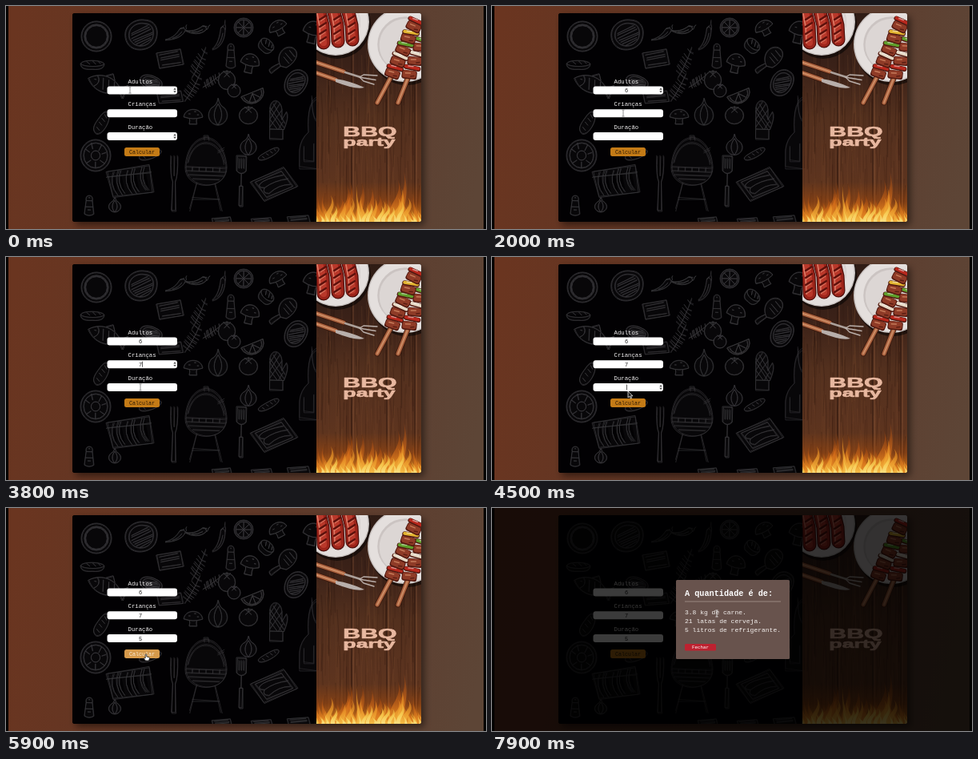
These frames come from a looping animation (600x279 px, 8 s). An HTML page with a canvas:

```html
<!DOCTYPE html>
<html lang="pt">
<head>
<meta charset="utf-8">
<title>Calculadora de churrasco</title>
<style>
html, body { margin: 0; width: 100%; height: 100%; overflow: hidden; background: #000; }
canvas { display: block; width: 600px; height: 279px; }
</style>
</head>
<body>
<canvas id="stage" width="600" height="279"></canvas>
<script>
const W = 600, H = 279, LOOP = 8000;
const MONO = '"Liberation Mono", monospace';
const view = document.getElementById('stage').getContext('2d');
const clamp = v => Math.min(1, Math.max(0, v));

let seed = 11;
function rand(a = 0, b = 1) {
  seed = (seed * 16807) % 2147483647;
  return a + (b - a) * seed / 2147483647;
}

function box(g, x, y, w, h, r, color) {
  g.fillStyle = color;
  g.beginPath();
  g.roundRect(x, y, w, h, r);
  g.fill();
}

function line(g, pts, color, width) {
  g.strokeStyle = color;
  g.lineWidth = width;
  g.beginPath();
  pts.forEach(([x, y]) => g.lineTo(x, y));
  g.stroke();
}

function disc(g, x, y, r, color) {
  g.fillStyle = color;
  g.beginPath();
  g.arc(x, y, r, 0, 7);
  g.fill();
}

function text(g, str, x, y, size, color, align = 'left', weight = '') {
  g.font = `${weight} ${size}px ${MONO}`;
  g.textAlign = align;
  g.fillStyle = color;
  g.fillText(str, x, y);
}

function blend(g, x0, y0, x1, y1, ...colors) {
  const grad = g.createLinearGradient(x0, y0, x1, y1);
  colors.forEach((c, i) => grad.addColorStop(i / (colors.length - 1), c));
  return grad;
}

// Chalk shapes, each in a box from -10 to 10.
const circle = r => `M${r} 0A${r} ${r} 0 1 1 ${-r} 0A${r} ${r} 0 1 1 ${r} 0`;
const shapes = {
  ring: circle(10) + circle(8) + circle(7.3),
  donut: circle(10) + circle(8) + circle(3) + 'M-7-4l3 2M-3-8l1 4M4-7l-2 4M7-2l-3 1M6 5l-3-2M0 8v-4M-6 5l3-2',
  citrus: circle(10) + circle(8.4) + 'M-8 0H8M0-8V8M-6-6L6 6M6-6L-6 6',
  half: 'M-10-3A10 10 0 0 0 10-3ZM-8-2A8 8 0 0 0 8-2M0-2V7M0-2L-5 4M0-2L5 4',
  steak: 'M-9 3C-12-5-4-10 2-9C8-9 11-4 9 2C7 9-6 11-9 3ZM-7 2C-9-4-3-8 2-7C7-7 8-3 7 1C5 7-4 8-7 2M-6-1L4-6M-6 0L5-5M-6 2L6-4M-5 3L7-2M-4 4L7-1M-3 5L6 1M-1 6L6 2',
  meat: 'M-10-2C-9-8 8-8 10-2C10 3 8 7 0 6C-8 7-10 3-10-2ZM-10-2C-8 3 8 3 10-2M-5-5l3 4M0-6l3 5M5-5l2 3',
  sausage: 'M-9 6C-12 2-6-1 0-4C7-8 11-7 10-3C9 2-5 10-9 6ZM-6 2l2 3M-2-1l2 3M2-3l2 3M6-5l1 3',
  chili: 'M8-9C6-6 9-5 7-3C5 6-4 9-10 9C-3 6 0 1 2-4C4-6 6-5 7-3M2-4L6-6M4-1Q1 5-4 7',
  sprig: 'M-8 10Q0 3 8-10M-6 7l-4-2M-6 7l4 2M-5 5l-4-3M-5 5l5 2M-3 4l-5-3M-3 4l5 2M-1 2l-5-3M-1 2l5 2M0 1l-5-3M0 1l5 2M2-1l-5-3M2-1l5 2M3-3l-4-3M3-3l5 1M6-7l-3-2M6-7l4 1',
  shaker: 'M-4-5L-6 8Q0 11 6 8L4-5ZM-4-5Q-5-10 0-10Q5-10 4-5M-5 1H5M-1-8h2M-2 4h4',
  mushroom: 'M-10 1C-9-12 9-12 10 1Q0 5-10 1ZM-4 3C-3 6-4 8-4 10H4C4 8 3 6 4 3M-5-3h2M1-6h2M4-2h2',
  drumstick: 'M-2 5C-6-2-1-11 6-9C12-6 9 2 2 6ZM-2 5L-7 9Q-9 12-10 8Q-9 6-3 3M1-5L6 1M4-7L8-2M0-2L4 3',
  fish: 'M-10 0C-5-8 3-7 7-1L10-5V5L7 1C3 7-5 8-10 0ZM-6-4Q-3 0-6 4M-3-4L-1 4M0-4L2 4M3-4L5 3M-7-1h1M-2-6L1-9L3-5',
  packet: 'M-10-6L8-9L10 6L-8 9ZM-8-4L6-7M-7-1L7-4M-7 1L7-2M-6 6L8 4',
  onion: 'M0-10Q-1-5-6-3C-12 3-6 9 0 9C6 9 12 3 6-3Q1-5 0-10ZM0-6C-5 0-4 5 0 9C4 5 5 0 0-6',
  tomato: circle(9) + 'M0-6l-4-3M0-6l4-3M0-6v-4M0-6l-3 3M0-6l3 3',
  mitt: 'M-6 5V-5C-6-11 4-11 5-5V0L9-4Q12-2 7 5ZM-6 5V10H6V5M-6-4L5 5M-6 0L1 5M-3-8L8 2M5-5L-6 4M3-8L-6 0M6 1L2 5M-6-6L7 4M0-9L-6-4',
  apron: 'M10-10Q-2-9 0 0Q-7 2-8 5V10H10M3-10Q3-3 10-3M-4 4V8H5V3',
  ribs: 'M-10-5L8-9L10 6L-7 9ZM-7-5Q-9 2-5 8M-5-6Q-7 1-3 8M-4-6Q-6 1-2 7M-1-6Q-3 1 1 7M1-7Q-1 0 3 7M2-7Q0 0 4 6M5-8Q3-1 7 5M6-8Q4-1 8 5M-10-2L9-5',
  fork: 'M-1 10L-.6 0Q-2-2-1.6-9M1 10L.6 0Q2-2 1.6-9M-1 10H1M0-9V-2',
  grill: 'M-9-1H9C9 5-9 5-9-1C-8-11 8-11 9-1M-8-2C-6-9 6-9 8-2M-9 0H9M-4 3L-7 10M4 3L7 10M-6 7H6M-1-8V-9H1V-8M5-5l3-1M-8 1H8M-6 2H6M-6-1v1M-3-1v1M0-1v1M3-1v1M6-1v1',
  spatula: 'M-2-10H2L2-4Q0-2-2-4ZM-1-9V-5M0-9V-5M1-9V-5M0-3V2M-.7 2V10H.7V2Z',
  tray: 'M-10-1L4-9L10 1L-4 9ZM-8-1L3-7L8 1L-3 7ZM-6 0Q-4-3 4-5M-4 2Q0-2 6-3M-2 5Q2 0 7 0M-6 0Q-7 2-4 2M-4 2Q-5 5-2 5'
};

// Two slightly shifted passes give a hand-drawn line.
function chalk(g, name, ...places) {
  const path = new Path2D(shapes[name]);
  for (const [x, y, sx, sy = sx, angle = 0] of places) {
    g.save();
    g.translate(x, y);
    g.rotate(angle);
    g.scale(sx / 10, sy / 10);
    g.lineWidth = 8 / Math.max(sx, sy);
    g.fill(path);
    g.stroke(path);
    g.rotate(.04);
    g.scale(.96, .96);
    g.stroke(path);
    g.restore();
  }
}

function drawChalkboard(g) {
  box(g, 83, 9, 306, 261, [3, 0, 0, 3], '#020103');
  g.save();
  g.beginPath();
  g.rect(83, 9, 305, 261);
  g.clip();
  g.strokeStyle = '#38373a';
  g.fillStyle = '#080709';
  chalk(g, 'ring', [113, 38, 19]);
  chalk(g, 'steak', [169, 37, 21, 22], [181, 96, 15, 10, .4], [362, 97, 14, 20, .4]);
  chalk(g, 'chili', [214, 33, 15, 11], [241, 28, 13, 12, .5], [267, 36, 11, 20, -.1]);
  chalk(g, 'citrus', [297, 27, 12]);
  chalk(g, 'half', [309, 112, 15, 14, -.4]);
  chalk(g, 'meat', [108, 74, 15, 9], [325, 50, 10, 13, .7]);
  chalk(g, 'sausage', [119, 146, 12, 18, -.3], [328, 185, 14, 9, -.2], [180, 186, 14, 10]);
  chalk(g, 'packet', [205, 66, 17, 13, -.05], [205, 114, 17, 9]);
  chalk(g, 'sprig', [241, 71, 11, 20], [233, 102, 12, 18], [258, 93, 8, 14, .5]);
  chalk(g, 'shaker', [281, 63, 10, 16], [104, 250, 10, 13]);
  chalk(g, 'mushroom', [305, 71, 12, 13, .2], [340, 27, 12, 10, -.5], [234, 138, 12, 10], [384, 32, 13, 15, .2]);
  chalk(g, 'drumstick', [347, 67, 18, 17]);
  chalk(g, 'fish', [126, 99, 25, 18, .35]);
  chalk(g, 'tomato', [276, 93, 12, 13], [303, 137, 13, 12], [285, 106, 9]);
  chalk(g, 'onion', [265, 133, 14, 18], [303, 174, 12, 14], [136, 249, 9, 10]);
  chalk(g, 'mitt', [338, 142, 14, 25]);
  chalk(g, 'apron', [378, 158, 14, 46]);
  chalk(g, 'donut', [112, 187, 19, 20]);
  chalk(g, 'ribs', [155, 219, 30, 23]);
  chalk(g, 'fork', [210, 220, 26, 37]);
  chalk(g, 'grill', [250, 207, 29, 50]);
  chalk(g, 'spatula', [294, 219, 30, 32]);
  chalk(g, 'tray', [335, 223, 30, 24]);
  chalk(g, 'packet', [270, 270, 13, 7], [320, 270, 14, 6], [366, 268, 15, 7]);
  g.restore();
}

function drawPlate(g, x, y, r) {
  disc(g, x + 2, y + 4, r, '#0008');
  disc(g, x, y, r, '#c9c3c1');
  disc(g, x, y, r - 1.5, '#e4dfdd');
  disc(g, x, y, r * .74, '#cbc4c2');
  disc(g, x + 1, y + 1, r * .71, '#dcd6d4');
}

function drawSausages(g) {
  for (let i = 0; i < 3; i++) {
    const x = 396 + i * 18, bottom = 46 - i * 2;
    const spine = [[x - 5, 4], [x, 24], [x + 1, bottom]];
    line(g, spine, '#4f0f0b', 17);
    line(g, spine, '#9c241a', 14.5);
    line(g, spine, '#b9382a', 8);
    line(g, [[x - 7, 10], [x - 4, 26], [x - 3, bottom]], '#dc7763', 1.8);
    for (let y = 14; y < 50; y += 9) {
      line(g, [[x - 4, y + 3], [x + 4, y - 2]], '#5b110c', 2.2);
      line(g, [[x - 3, y + 5], [x + 3, y + 1]], '#e08a72', .9);
    }
  }
}

function drawGrip(g, from, to) {
  line(g, [from, to], '#3f1b0e', 7);
  line(g, [from, to], '#ab6340', 5);
  line(g, [from, to], '#cf9068', 1.6);
}

function drawSkewer(g, from, grip, to) {
  line(g, [from, to], '#b5aaa2', 1.4);
  drawGrip(g, from, grip);
  const angle = Math.atan2(to[1] - grip[1], to[0] - grip[0]) + Math.PI / 2;
  const greens = ['#b9281d', '#e6d9c6', '#5f9e2b', '#e3b531'];
  const count = Math.floor(Math.hypot(to[0] - grip[0], to[1] - grip[1]) / 8);
  for (let i = 0; i < count; i++) {
    const p = (i + .6) / count, meat = i % 2 === 0;
    const half = meat ? 5.5 : 3, width = meat ? 17 : 20;
    g.save();
    g.translate(grip[0] + (to[0] - grip[0]) * p, grip[1] + (to[1] - grip[1]) * p);
    g.rotate(angle + rand(-.3, .1));
    box(g, -width / 2 - 1, -half, width + 2, half * 2, 3, '#51180f');
    box(g, -width / 2, -half + .5, width, half * 2 - 2, 3, meat ? '#8f3b27' : greens[(i >> 1) % 4]);
    line(g, [[-5, -1.5], [1, -2]], meat ? '#c67a59' : '#fff7', 1.5);
    if (meat) line(g, [[2, 2], [6, 1]], '#5a1d12', 1.5);
    g.restore();
  }
}

function drawCutlery(g) {
  drawGrip(g, [386, 70], [422, 82]);
  line(g, [[424, 83], [443, 89]], '#aba09a', 2.5);
  for (let i = 0; i < 3; i++)
    line(g, [[442, 89], [447, 86 + i * 4], [464 - i * 2, 87 + i * 5.5]], '#b9aea9', 1.4);
  drawGrip(g, [386, 83], [412, 92]);
  g.fillStyle = '#b8afab';
  g.fill(new Path2D('M412 91Q431 94 448 102Q437 105 412 95Z'));
}

function drawWood(g) {
  g.fillStyle = blend(g, 0, 9, 0, 270, '#2f1c15', '#3a2118', '#53301e', '#5b331f', '#66371a');
  g.fillRect(388, 9, 131, 261);
  for (let i = 0; i < 150; i++) {
    const x = rand(388, 519), y = rand(0, 240), bend = rand(-2, 2);
    line(g, [[x, y], [x + bend, y + 25], [x, y + rand(40, 110)]], i % 2 ? '#1d0b0638' : '#8f593722', rand(.4, 1.5));
  }
  for (const x of [432, 476, 511]) {
    line(g, [[x, 9], [x, 270]], '#1b0c08a0', 1);
    line(g, [[x + 2, 9], [x + 2, 270]], '#7d4d3360', 2);
  }
}

function drawWisp(g, x, w, h, lean, top, mid, low) {
  g.fillStyle = blend(g, 0, 272 - h, 0, 272, top, mid, low);
  g.beginPath();
  g.moveTo(x - w, 272);
  g.bezierCurveTo(x - w - lean, 272 - h * .45, x + lean * 1.8, 272 - h * .55, x + lean * .6, 272 - h);
  g.bezierCurveTo(x + lean * 2.2 + 2, 272 - h * .5, x - lean * .6 + w * .4, 272 - h * .4, x + w, 272);
  g.fill();
}

function drawFlames(g) {
  g.fillStyle = blend(g, 0, 220, 0, 270, '#b8520c00', '#b8520c60', '#dd8a20');
  g.fillRect(388, 220, 131, 50);
  const peak = x => 38 + 18 * Math.exp(-(((x - 438) / 16) ** 2)) + 24 * Math.exp(-(((x - 489) / 10) ** 2));
  const layers = [
    [1, 6, '#c4500c30', '#d9701a90', '#e8952a'],
    [.85, 4, '#e8861e90', '#efa02ec0', '#f5c04a'],
    [.55, 3, '#f6c03c70', '#f9d257d0', '#fbe38a']
  ];
  for (const [size, width, ...colors] of layers) {
    for (let x = 389; x < 522; x += 6.5) {
      const lean = rand(3, 7) * (rand() < .5 ? -1 : 1);
      drawWisp(g, x + rand(-2, 2), width * rand(.6, 1.1), peak(x) * size * rand(.6, 1.12), lean, ...colors);
    }
  }
}

function drawLettering(g) {
  g.translate(421, 0);
  g.scale(1.78, 1);
  g.fillStyle = g.strokeStyle = '#e8b8a0';
  g.lineWidth = .6;
  g.textAlign = 'left';
  for (const [word, y, size] of [['BBQ', 163, 17], ['party', 174.5, 15]]) {
    g.font = `bold ${size}px "Liberation Sans", sans-serif`;
    g.fillText(word, .2, y);
    g.strokeText(word, .2, y);
  }
}

function drawPoster(g) {
  g.save();
  g.beginPath();
  g.roundRect(388, 9, 131, 261, [0, 3, 3, 0]);
  g.clip();
  drawWood(g);
  g.lineCap = g.lineJoin = 'round';
  drawPlate(g, 412, 20, 42);
  drawSausages(g);
  drawPlate(g, 499, 48, 47);
  drawSkewer(g, [490, 121], [502, 91], [523, 40]);
  drawSkewer(g, [464, 121], [481, 89], [514, 16]);
  drawCutlery(g);
  drawFlames(g);
  drawLettering(g);
  g.restore();
}

function buildScene() {
  const canvas = document.createElement('canvas');
  canvas.width = W;
  canvas.height = H;
  const g = canvas.getContext('2d');
  g.fillRect(0, 0, W, H);
  g.fillStyle = blend(g, 3, 60, 597, 180, '#6a3520', '#643623', '#5f3828', '#5e3e2f', '#5d4536');
  g.fillRect(3, 0, 594, H);
  g.save();
  g.shadowColor = '#0007';
  g.shadowBlur = 8;
  g.shadowOffsetX = g.shadowOffsetY = 4;
  box(g, 83, 9, 436, 261, 3, '#020103');
  g.restore();
  drawChalkboard(g);
  drawPoster(g);
  return canvas;
}

const scene = buildScene();

const fields = [
  { label: 'Adultos', y: 100.5, value: '6', focus: 500, typed: 1400, blur: 2200 },
  { label: 'Crianças', y: 129.2, value: '7', focus: 2200, typed: 2700, blur: 4100 },
  { label: 'Duração', y: 158, value: '5', focus: 4400, typed: 4900, blur: 5800 }
];

const route = [[0, 155, 105], [1500, 155, 105], [2000, 164, 134], [2700, 165, 134], [3100, 168, 155],
  [3500, 168, 163], [4100, 168, 163], [4300, 170, 168], [5300, 170, 168], [5750, 175, 183],
  [7100, 175, 183], [7900, 281, 132]];

function pointerAt(t) {
  const i = Math.max(1, route.findIndex(k => k[0] > t));
  const last = route[route.length - 1];
  if (t >= last[0]) return [last[1], last[2]];
  const [t0, x0, y0] = route[i - 1], [t1, x1, y1] = route[i];
  const p = clamp((t - t0) / (t1 - t0)), e = p * p * (3 - 2 * p);
  return [x0 + (x1 - x0) * e, y0 + (y1 - y0) * e];
}

function drawForm(g, t, hover) {
  for (const f of fields) {
    text(g, f.label, 152.5, f.y - 4, 7.3, '#f4f2f2');
    box(g, 126.5, f.y, 87.5, 10, 3, '#fff');
    const filled = t >= f.typed, focused = t >= f.focus && t < f.blur;
    if (filled) text(g, f.value, 168, f.y + 7.5, 7, '#222', 'center');
    const spin = focused || (t < 500 && f.value !== '7');
    if (spin) {
      g.fillStyle = '#444';
      g.fill(new Path2D(`M209.3 ${f.y + 4.3}l1.7-2.2 1.7 2.2zM209.3 ${f.y + 5.7}l1.7 2.2 1.7-2.2z`));
    }
    const since = t - (filled ? f.typed : f.focus);
    if (focused && since % 1000 < 500) {
      const x = filled ? 170.5 : 168.5;
      line(g, [[x, f.y + 1.5], [x, f.y + 8.5]], '#333', .8);
    }
  }
  box(g, 148, 177, 44, 11, 2.5, hover ? '#d69a4b' : '#c47b16');
  text(g, 'Calcular', 170, 185, 6.7, hover ? '#f7e9d5' : '#2c1906', 'center');
}

function drawModal(g, t) {
  const shown = clamp((t - 6050) / 250);
  if (!shown) return;
  g.save();
  g.globalAlpha = shown;
  g.fillStyle = 'rgba(0,0,0,.77)';
  g.fillRect(0, 0, W, H);
  g.translate(0, -28 * (1 - clamp((t - 6200) / 400)) ** 2);
  box(g, 230, 90, 142, 99, 1.5, '#68534d');
  text(g, 'A quantidade é de:', 241, 110, 10.2, '#fff', 'left', 'bold');
  line(g, [[241, 117], [361, 117]], '#a5968f', .8);
  ['3.8 kg de carne.', '21 latas de cerveja.', '5 litros de refrigerante.'].forEach((row, i) =>
    text(g, row, 241, 133 + i * 11, 8, '#f5f1ef'));
  box(g, 241, 170, 39, 8.5, 1.5, '#bd2230');
  text(g, 'Fechar', 260.5, 176.3, 5.9, '#fff', 'center');
  g.restore();
}

const cursors = {
  arrow: new Path2D('M0 0V8L2 6.3L3.3 9L4.7 8.3L3.4 5.8H6Z'),
  hand: new Path2D('M-.8 4V.3Q0-.8 .8 .3V3L4 3.8Q4.6 4.2 4.2 6L3.4 8H-.6L-2.8 5Q-2.5 3.8-.8 5Z'),
  beam: new Path2D('M-1.6-4H1.6M0-4V4M-1.6 4H1.6')
};

function cursorKind(t, x, y) {
  if (t > 5500 && t < 7150) return y > 177 ? 'hand' : 'arrow';
  if (t >= 7150) return x > 241 && y < 157 ? 'beam' : 'arrow';
  return y > 167 ? 'arrow' : 'beam';
}

function drawCursor(g, kind, x, y) {
  g.save();
  g.translate(x, y);
  if (kind === 'beam') {
    const overField = x < 214 && fields.some(f => y > f.y && y < f.y + 10);
    g.strokeStyle = overField ? '#888' : '#ddd';
    g.lineWidth = .9;
    g.stroke(cursors.beam);
  } else {
    g.fillStyle = kind === 'hand' ? '#fff' : '#222';
    g.strokeStyle = kind === 'hand' ? '#222' : '#eee';
    g.lineWidth = .8;
    g.fill(cursors[kind]);
    g.stroke(cursors[kind]);
  }
  g.restore();
}

function render(t) {
  const [x, y] = pointerAt(t);
  const kind = cursorKind(t, x, y);
  view.drawImage(scene, 0, 0);
  drawForm(view, t, kind === 'hand' && t < 6100);
  drawModal(view, t);
  drawCursor(view, kind, x, y);
}

function frame(now) {
  render(now % LOOP);
  requestAnimationFrame(frame);
}
requestAnimationFrame(frame);
</script>
</body>
</html>
```
